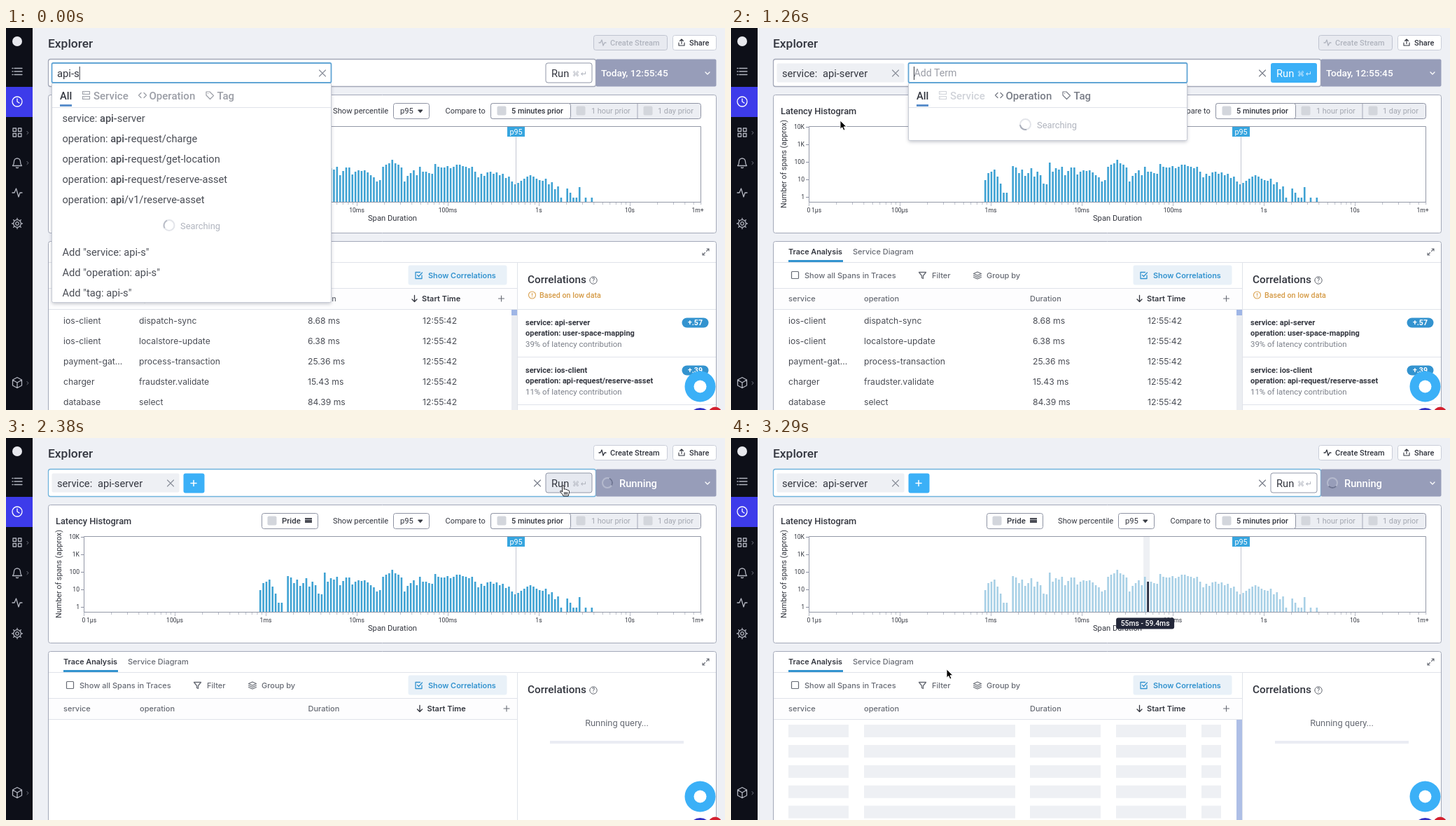
Write an HTML page with a canvas that moves like this. It is 1027 by 545 pixels and loops after 3360 ms.

```html
<!DOCTYPE html>
<html lang="en">
<head>
<meta charset="utf-8">
<title>Explorer</title>
<style>
html, body { margin: 0; width: 100%; height: 100%; overflow: hidden; background: #eef0f5; }
canvas { display: block; width: 1027px; height: 545px; }
</style>
</head>
<body>
<canvas id="stage"></canvas>
<script>
const W = 1027, H = 545, LOOP = 3360, STEP = 70;
const PICKED = 1120, LISTED = 1540, RUN = 2310, LOADING = 2590;
const INK = '#33363f', SOFT = '#4a4d55', GREY = '#676b74', PALE = '#b0b4be', EDGE = '#a3a8b8', RULE = '#e0e3ea';
const BLUE = '#3393cf', SKY = '#3bb0f7', BAR = '#3fa2d3';

const canvas = document.getElementById('stage');
const ratio = window.devicePixelRatio || 1;
canvas.width = W * ratio;
canvas.height = H * ratio;
const c = canvas.getContext('2d');

// y is the middle of the capitals; returns the x where the text ends
function text(s, x, y, size = 14.7, color = INK, weight = 400, face = 'Roboto', align = 'left') {
  c.font = `${weight} ${size}px ${face}, sans-serif`;
  c.fillStyle = color;
  c.textAlign = align;
  c.fillText(s, x, y + size * 0.35);
  return x + c.measureText(s).width;
}
const inter = (s, x, y, size = 11, color = GREY, weight = 500) => text(s, x, y, size, color, weight, 'Inter');
const mid = (s, x, y, size, color, weight) => text(s, x, y, size, color, weight, 'Roboto', 'center');

function fill(x, y, w, h, color) {
  c.fillStyle = color;
  c.fillRect(x, y, w, h);
}
function box(x, y, w, h, color, edge, r = 3, line = 1) {
  c.beginPath();
  c.roundRect(x + 0.5, y + 0.5, w - 1, h - 1, r);
  if (color) { c.fillStyle = color; c.fill(); }
  if (edge) { c.strokeStyle = edge; c.lineWidth = line; c.stroke(); }
}
function disc(x, y, r, color) {
  c.beginPath();
  c.arc(x, y, r, 0, 7);
  c.fillStyle = color;
  c.fill();
}
function icon(d, x, y, color, line = 1.3, inside) {
  c.save();
  c.translate(x, y);
  c.lineWidth = line;
  c.strokeStyle = color;
  c.lineJoin = c.lineCap = 'round';
  const path = new Path2D(d);
  if (inside) { c.fillStyle = inside; c.fill(path); }
  c.stroke(path);
  c.restore();
}
const ring = r => `M${-r} 0a${r} ${r} 0 1 0 ${2 * r} 0a${r} ${r} 0 1 0 ${-2 * r} 0`;
const CROSS = 'M-4.5-4.5l9 9M4.5-4.5l-9 9', PLUS = 'M-4 0h8M0-4v8';
const PULSE = 'M-7 0h3l2.5-6 3.5 12L4 0h3';
const SMALL_PULSE = 'M-5 0h2l2-4 2 8L3 0h2';
const CARET = 'M-3-1.5L0 1.5 3-1.5';

function spinner(x, y, r, t, base, tip) {
  c.lineWidth = 2;
  c.strokeStyle = base;
  c.beginPath(); c.arc(x, y, r, 0, 7); c.stroke();
  const a = t / 700 * Math.PI * 2 + 2.6;
  c.strokeStyle = tip;
  c.beginPath(); c.arc(x, y, r, a, a + 1.7); c.stroke();
}

const SIDE = [
  [62, 'M-7-4.5h1M-4-4.5H7M-7 0h1M-4 0H7M-7 4.5h1M-4 4.5H7'],
  [105, ring(7) + 'M0-4V0l3 2'],
  [149, 'M-6-6h4.5v4.5h-4.5zM1.5-6h4.5v4.5h-4.5zM-6 1.5h4.5v4.5h-4.5zM1.5 1.5h4.5v4.5h-4.5z', 1],
  [192, 'M-6.5 4.5c2-2 2-4 2-6a4.5 4.5 0 0 1 9 0c0 2 0 4 2 6zM-1.5 7a2 2 0 0 0 3 0', 1],
  [235, PULSE],
  [279, ring(2.3) + ring(5.4) + 'M0-7.5v2M0 5.5v2M-7.5 0h2M5.5 0h2M-5.3-5.3l1.4 1.4M5.3-5.3l-1.4 1.4M-5.3 5.3l1.4-1.4M5.3 5.3l-1.4-1.4'],
  [506, 'M0-7.5L6.5-4V4L0 7.5-6.5 4V-4zM-6.5-4L0 0 6.5-4M0 0V7.5', 1]
];

function sidebar() {
  fill(0, 0, 38, H, '#0d0f18');
  fill(0, 84, 38, 43, '#3d3bea');
  disc(16, 19, 7, '#e8e9ee');
  for (const [y, d, more] of SIDE) {
    icon(d, 16, y, y === 105 ? '#fff' : '#b3b6c0');
    if (more) icon('M-1-2L1 0-1 2', 31, y + 0.5, '#777b88', 1);
  }
}

function header(running) {
  text('Explorer', 60, 21.5, 17.4, INK, 500);
  const tone = running ? INK : PALE;
  box(839, 10, 106, 22, running ? '#fff' : '#e8eaf0', running ? '#c9cdd8' : '#bfc3cf');
  icon(SMALL_PULSE, 852, 21, tone);
  text('Create Stream', 863, 21, 11, tone, 500);
  box(952, 10, 63, 22, '#fff', '#c9cdd8');
  icon('M-4 0v4h8V0M0 1.5v-6M-2.5-2.5L0-5l2.5 2.5', 965, 21, INK, 1.1);
  text('Share', 976, 21, 11, INK, 500);
}

function searchBar(t, at) {
  const running = t >= RUN, picked = t >= PICKED;
  box(60, 44, 783, 40, '#fff', running ? '#6fb3dc' : EDGE, 3, 1.3);
  box(842, 44, 173, 40, '#979db9', null, 2);
  if (running) {
    spinner(859, 64, 7, t, '#b4b9cd', '#6f7693');
    text('Running', 876, 64.5, 14.7, '#fff', 500);
  } else {
    text('Today, 12:55:45', 850, 64.5, 13.7, '#fff', 500);
  }
  icon(CARET, 1002, 64.5, '#fff');

  const hover = at && at[0] > 771 && at[0] < 837 && at[1] > 50 && at[1] < 78;
  const lit = picked && !running;
  box(770.5, 49.5, 67, 29, lit ? (hover ? BLUE : SKY) : running && hover ? '#e6e9f0' : '#fff', lit ? null : '#9197a8');
  text('Run', 779, 64.5, 14.7, lit ? '#fff' : INK);
  text('⌘', 809, 65, 10, lit ? '#cdeaff' : PALE, 400, 'DejaVu Sans');
  text('↵', 821, 65, 11, lit ? '#cdeaff' : PALE, 400, 'DejaVu Sans');

  if (picked) {
    box(65, 50, 183, 28, '#eef0f4', null, 2);
    text('service:', 73, 64.5);
    text('api-server', 131, 64.5);
    icon(CROSS, 235, 64.5, '#888d99', 1.1);
    icon(CROSS, 759, 64.5, '#777c88', 1.1);
  }
  if (running) {
    box(253, 50, 31, 29, SKY);
    icon(PLUS, 268, 64.5, '#fff', 1.5);
  }
}

const HEIGHTS = [
  31, 41, 43, 46, 36, 26, 13, 13, 0, 51, 49, 41, 46, 37, 41, 48, 36, 43, 38, 26, 25, 56, 43, 48, 46, 50, 38, 44,
  49, 49, 39, 43, 45, 44, 45, 42, 38, 35, 29, 31, 50, 53, 55, 60, 55, 53, 49, 29, 37, 41, 45, 38, 50, 43, 43,
  41, 40, 54, 50, 49, 49, 51, 48, 50, 53, 53, 51, 50, 48, 50, 43, 35, 40, 37, 42, 43, 40, 42, 38, 40, 34, 36, 29,
  25, 27, 30, 33, 36, 38, 36, 33, 31, 30, 33, 25, 28, 18, 22, 6, 0, 19, 13, 6, 6, 21, 0, 6, 0, 6
];
const PITCH = 4.385, LAST_HOVER = 53;
const barX = k => 363.2 + PITCH * k;

function histogram(t, at) {
  box(60, 95, 955, 198, '#fff', EDGE);
  text('Latency Histogram', 71, 118.5, 12.8, INK, 500);
  box(365, 107, 81, 23, '#fff', '#8e93a3');
  box(373, 111, 14, 14, '#d3d6dc', null, 2);
  text('Pride', 394, 118.5, 11.4, INK, 500);
  fill(427, 114, 10, 7, '#4b4d55');
  fill(427, 116, 10, 1, '#a9abb2');
  text('Show percentile', 467, 118.5, 11.2);
  box(553, 107, 52, 23, '#fff', '#8e93a3');
  text('p95', 563, 118.5, 11.2);
  icon('M-3-1.5h6L0 2z', 592, 118.5, INK, 1, INK);
  text('Compare to', 627.5, 118.5, 11);
  box(692, 107, 301, 23, '#eceef3', '#8e93a3');
  box(692, 107, 115, 23, '#fff', '#8e93a3');
  fill(901.5, 108, 1, 21, EDGE);
  [[701, '5 minutes prior', 722], [814, '1 hour prior', 836], [910, '1 day prior', 931]].forEach(([x, label, lx], i) => {
    box(x, 111, 14, 14, '#d3d6dc', null, 2);
    text(label, lx, 118.5, 10.9, i ? '#a4a8b1' : INK, i ? 400 : 500);
  });

  // axes
  ['10K', '1K', '100', '10', '1'].forEach((label, i) => {
    const y = 141 + 25 * i;
    text(label, 105, y, 8.6, INK, 400, 'Roboto', 'right');
    fill(107, y, 5, 1, '#8e93a3');
  });
  c.save();
  c.translate(75, 194);
  c.rotate(-Math.PI / 2);
  mid('Number of spans (approx)', 0, 0, 10.8, INK);
  c.restore();
  for (let d = 0; d < 7; d++) {
    for (let n = 1; n < 10; n++) {
      const x = 111 + 130 * (d + Math.log10(n));
      if (x < 993) fill(x, 248, 1, n > 1 ? 4 : 6, '#b4b8c4');
    }
  }
  mid('0', 111, 259.5, 8.6, INK);
  mid('1µs', 122, 259.5, 8.6, INK);
  ['100µs', '1ms', '10ms', '100ms', '1s', '10s'].forEach((s, i) => mid(s, 241 + 130 * i, 259.5, 8.6, INK));
  mid('1m+', 988, 259.5, 8.6, INK);
  mid('Span Duration', 552, 271.5, 11.2, INK);

  // the hovered bar stays marked once the pointer has passed it
  const hovering = t > LOADING && at[1] > 141;
  const hovered = hovering ? Math.max(LAST_HOVER, Math.round((at[0] - barX(0)) / PITCH)) : -1;
  if (hovering) fill(barX(hovered) - 6.5, 141, 9, 107, '#eef0f4');
  HEIGHTS.forEach((h, k) => {
    if (h) fill(barX(k) - 1.3, 248 - h, 2.6, h, k === hovered ? '#1d2136' : hovering ? '#a8d0e6' : BAR);
  });
  box(111, 140, 882, 109, null, '#9398a7', 0);
  fill(728, 155, 1, 93, '#c3c7d2');
  fill(716, 141, 25, 14, '#36a5df');
  mid('p95', 728.5, 148, 10.8, '#fff');
  if (hovering) {
    const x = barX(hovered) - 4, from = 55 * 10 ** ((hovered - LAST_HOVER) / 30);
    const show = v => `${v < 100 ? Math.round(v * 10) / 10 : Math.round(v)}ms`;
    box(x - 42, 256, 84, 17, '#232739', null, 3);
    mid(`${show(from)} - ${show(from * 1.08)}`, x, 264.5, 10.4, '#fff', 500);
  }
}

const ROWS = [
  ['ios-client', 'dispatch-sync', '8.68 ms'],
  ['ios-client', 'localstore-update', '6.38 ms'],
  ['payment-gat...', 'process-transaction', '25.36 ms'],
  ['charger', 'fraudster.validate', '15.43 ms'],
  ['database', 'select', '84.39 ms']
];
const COLUMNS = [82, 190, 431, 595];
const CELLS = [[82, 86], [190, 216], [427, 101], [550, 100], [672, 28]];

function traces(t) {
  const running = t >= RUN, empty = running && t < LOADING;
  box(60, 304, 955, 260, '#fff', EDGE);
  inter('Trace Analysis', 82, 319.5, 10.8, INK, 600);
  inter('Service Diagram', 174, 319.5);
  icon('M1-1L4.5-4.5M1.5-4.5h3v3M-1 1l-3.5 3.5M-1.5 4.5h-3v-3', 999.5, 319.5, GREY, 1.1);
  fill(61, 334, 953, 1, RULE);
  fill(82, 331, 78, 3, BLUE);

  box(86, 347, 11, 11, '#fff', GREY, 1, 1.2);
  inter('Show all Spans in Traces', 105, 353);
  icon('M-5-4.5H5L1 .5V4.5L-1 3.5V.5z', 273.5, 353, GREY);
  inter('Filter', 287, 353);
  icon('M0-5L5.5-2.5 0 0-5.5-2.5zM-5.5 0L0 2.5 5.5 0M-5.5 2.5L0 5 5.5 2.5', 352, 353, GREY, 1.1);
  inter('Group by', 365, 353);
  box(574, 338, 142, 29, '#e9f1f8', null);
  icon('M4.5 0v4.5h-9v-9H2M-2-.5L0 1.5 5-4', 589.5, 353, BLUE);
  inter('Show Correlations', 603, 353, 10.9, BLUE, 600);

  fill(61, 371, 669, 1, RULE);
  fill(61, 372, 669, 29, '#fdfdfe');
  fill(61, 401, 669, 1, RULE);
  const shift = empty ? 7.5 : 0;
  inter('service', 82, 386);
  inter('operation', empty ? 191 : 190, 386);
  inter('Duration', empty ? 431.5 : 427, 386);
  icon('M0-4.5v9M-3.5 1L0 4.5 3.5 1', 583.5 + shift, 386, INK);
  inter('Start Time', 594 + shift, 386, 11, INK, 600);
  icon(PLUS, 707.5 + shift, 386, GREY, 1.1);

  ROWS.forEach((row, i) => {
    const y = 418 + 28.9 * i;
    if (!running) [...row, '12:55:42'].forEach((s, j) => inter(s, COLUMNS[j], y, 12.2, SOFT, 400));
    else if (!empty) CELLS.forEach(([x, w]) => fill(x, y - 9, w, 18, '#eef0f4'));
  });
  if (!empty) {
    fill(722, 402, 8, 143, '#eceef2');
    fill(722, 402, 8, running ? 143 : 8, running ? '#aebfe6' : '#9fb6e6');
  }
  fill(730, 335, 1, 210, RULE);
}

function correlation(y, score, service, operation, share) {
  text('service: ' + service, 742, y, 11, INK, 600);
  text('operation: ' + operation, 742, y + 14.5, 11, INK, 600);
  text(share + ' of latency contribution', 742, y + 31, 11.4, '#7c808a');
  box(965, y - 7.5, 39, 15, BLUE, null, 7);
  mid(score, 984.5, y, 10.5, '#fff', 700);
}

function correlations(running) {
  text('Correlations', 745, 358.5, 15.3, INK, 500);
  icon(ring(5.2), 839, 360, GREY, 1);
  mid('?', 839, 360, 8.5, GREY, 500);
  if (running) {
    mid('Running query...', 872.5, 407, 12.8, GREY);
    fill(777, 432, 191, 4, '#eaecf3');
  } else {
    icon(ring(5) + 'M0-2.5V.5M0 2.4v.1', 751.5, 381, '#d9a04e', 1.1);
    text('Based on low data', 762, 381, 10.7, '#d59a45', 500);
    for (const y of [401, 469, 537]) fill(731, y, 283, 1, RULE);
    correlation(420.5, '+.57', 'api-server', 'user-space-mapping', '39%');
    correlation(488.5, '+.39', 'ios-client', 'api-request/reserve-asset', '11%');
  }
  disc(991.5, 558, 16, '#3230c4');
  disc(1013, 550, 9.5, '#d3202f');
  disc(991.5, 511.5, 22, SKY);
  disc(991.5, 511.5, 9, '#fff');
}

function dropdown(x, w, bottom, dx, noService) {
  c.save();
  c.shadowColor = 'rgba(40,45,70,.28)';
  c.shadowBlur = 5;
  c.shadowOffsetY = 2;
  box(x, 78, w, bottom - 78, '#fff', null, 2);
  c.restore();
  box(x, 78, w, bottom - 78, null, '#c6cad4', 2);
  box(x, 49.5, w, 29, '#fff', '#62a5d5', 2, 1.8);
  const tone = '#9b9ea6', first = noService ? '#d0d3d9' : tone, rest = noService ? '#787c86' : tone;
  text('All', 77 + dx, 96.5, 14.7, INK, 500);
  fill(77 + dx, 109, 17, 3, '#5b8fcb');
  icon('M-5-5.5H5v4H-5zM-5 1.5H5v4H-5zM-3-3.5h.2M-3 3.5h.2', 114.5 + dx, 96, first, 1.1);
  text('Service', 125 + dx, 96.5, 15, first, 500);
  icon('M-2-3.5L-5.5 0-2 3.5M2-3.5L5.5 0 2 3.5', 195 + dx, 96, rest);
  text('Operation', 204.5 + dx, 96.5, 15, rest, 500);
  icon('M-5-5H0L5.5.5.5 5.5-5 0zM-2.5-2.5h.2', 291 + dx, 96, rest, 1.2);
  text('Tag', 301.5 + dx, 96.5, 15, rest, 500);
  fill(x + 1, 113, w - 2, 1, RULE);
}

const OPTIONS = ['service: api-server', 'operation: api-request/charge', 'operation: api-request/get-location',
  'operation: api-request/reserve-asset', 'operation: api/v1/reserve-asset'];
const TERMS = ['operation: api/v1/charge', 'operation: api/v1/get-location', 'operation: api/v1/reserve-asset',
  'operation: user-space-mapping', 'tag: asset-id="ride-a41fz"', 'tag: customer_id="ACME"', 'tag: customer_id="BEEMO"',
  'tag: customer_id="non-vip"', 'tag: lightstep.hostname="LS-MAC-041.local"', 'tag: lightstep.tracer_platform="go"',
  'tag: lightstep.tracer_platform_version="go1.12.6"', 'tag: lightstep.tracer_version="0.16.0"',
  'tag: place-id="afb1c3"', 'tag: subnetwork="us-east1"', 'tag: type="POST"'];
const rowY = i => 129 + 28.85 * i;

function option(s, match, y) {
  const [kind, value] = s.split(': ');
  let x = text(kind + ': ', 80.5, y, 14.6, SOFT);
  value.split(match).forEach((part, i) => { x = text(part, x, y, 14.6, SOFT, i % 2 ? 500 : 400); });
}

function typing(t) {
  const typed = 'api-server'.slice(0, 5 + [140, 280, 350, 490, 630].filter(k => t >= k).length);
  const early = typed.length === 5;
  const list = early ? OPTIONS : [OPTIONS[0], OPTIONS[3]];
  const kinds = ['service', 'operation', 'tag'].slice(typed === 'api-server' ? 1 : 0);
  const rows = list.length + kinds.length;
  dropdown(65, 400, early ? 392 : rowY(rows - 1) + 15, 0);
  const end = text(typed, 73, 64.5, 14.8);
  fill(end, 55, 1, 19, INK);
  icon(CROSS, 452, 64.5, '#888d99', 1.1);
  const match = early ? /(api-?)/ : new RegExp(`(api-|${typed.slice(4, 8)})`);
  list.forEach((s, i) => option(s, match, rowY(i)));
  if (early) {
    spinner(233, 281.5, 7.5, t, '#e3e5ea', '#b9bdc7');
    text('Searching', 249, 282, 12.9, PALE);
  }
  kinds.forEach((kind, i) => {
    text(`Add "${kind}: ${typed}"`, 80.5, rowY(list.length + i) + (early ? 46.8 : 0), 14.7, SOFT);
  });
}

function adding(t) {
  const listed = t >= LISTED;
  dropdown(253, 399, listed ? 541 : 161, 188, true);
  text('Add Term', 261.5, 64.5, 14.1, '#9a9da6');
  if (t < 1680) fill(261, 55, 1, 19, INK);
  if (listed) {
    TERMS.forEach((s, i) => text(s, 268.5, rowY(i), 14.45, SOFT));
  } else {
    spinner(420.5, 137.5, 7.5, t, '#e3e5ea', '#a9aeba');
    text('Searching', 437, 138, 12.9, PALE);
  }
}

const PATH = [[280, 142, 147], [420, 147, 140], [770, 156, 133], [1400, 156, 132], [1820, 796, 68], [2730, 796, 68], [3290, 308, 330]];

function pointerAt(t) {
  if (t < PATH[0][0]) return null;
  const i = PATH.findIndex(p => p[0] > t);
  if (i < 0) return PATH[PATH.length - 1].slice(1);
  const [t0, x0, y0] = PATH[i - 1], [t1, x1, y1] = PATH[i];
  const u = (t - t0) / (t1 - t0), e = u * u * (3 - 2 * u);
  return [x0 + (x1 - x0) * e, y0 + (y1 - y0) * e];
}

function pointer(t, [x, y]) {
  const onRun = x > 771 && x < 837 && y < 78;
  const onMenu = t < PICKED || (t < RUN && x > 254 && x < 652);
  if (onRun || onMenu) {
    icon('M-1.5 1.2C-1.5-.6 1.2-.6 1.2 1.2V5.2C3 4.6 3.6 5 4 5.8 5.4 5.2 6 5.8 6.3 6.6 8 6.2 8.5 7 8.5 8.2 8.5 11 7.4 12 7.2 14.8H0C-.5 12-4.5 9.6-4.3 7.8-4 6.6-2.6 7.4-1.5 8.8zM1.6 9.5v3M3.5 9.5v3M5.4 9.5v3',
      x, y, '#16171c', 1, '#fff');
  } else {
    icon('M0 0V12.2L2.8 9.6 4.8 14 7 13 5 8.8H8.8z', x, y, '#fff', 1, '#000');
  }
}

function draw(t) {
  c.setTransform(ratio, 0, 0, ratio, 0, 0);
  fill(0, 0, W, H, '#eef0f5');
  const at = pointerAt(t), running = t >= RUN;
  sidebar();
  header(running);
  searchBar(t, at);
  histogram(t, at);
  traces(t);
  correlations(running);
  if (t < PICKED) typing(t);
  else if (!running) adding(t);
  if (at) pointer(t, at);
}

const start = performance.now();
function frame() {
  const t = (performance.now() - start) % LOOP;
  draw(Math.floor(t / STEP) * STEP);
  requestAnimationFrame(frame);
}
frame();
</script>
</body>
</html>
```
